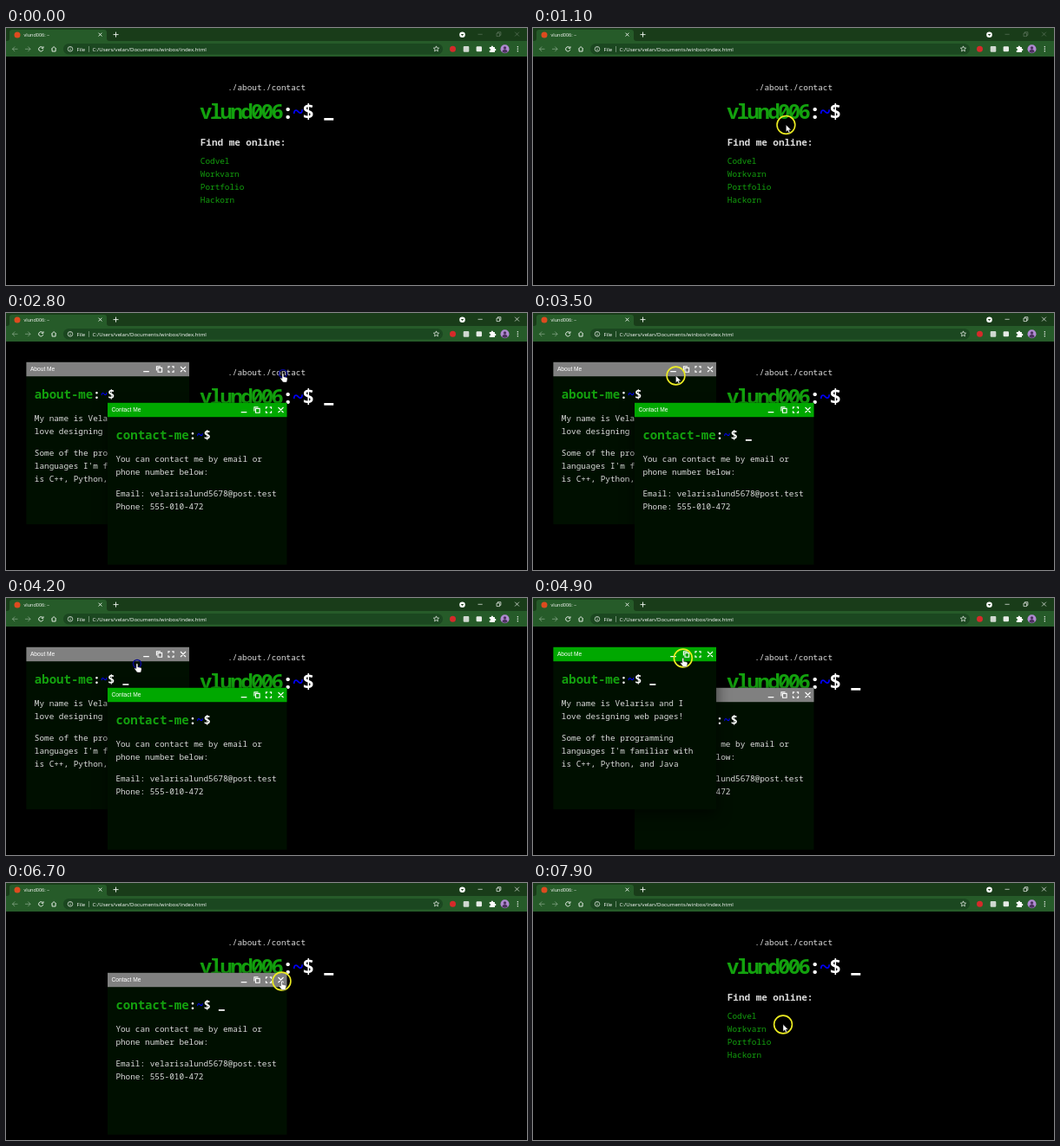
These frames come from a looping animation (600 px wide and 297 px high, 8000 ms). An HTML page:

```html
<!DOCTYPE html>
<html lang="en">
<head>
<meta charset="utf-8">
<title>Terminal page</title>
<style>
  html, body { margin: 0; width: 100%; height: 100%; overflow: hidden; background: #000; }
  svg { display: block; width: 600px; height: 297px; }
  text { white-space: pre; }
  .mono { font: 9.37px "Noto Sans Mono", "DejaVu Sans Mono", monospace; fill: #dcdcdc; }
  .ui { font: 500 6.1px "Open Sans", "Noto Sans", sans-serif; fill: #fff; }
  .bar { font: 6.65px "Liberation Sans", Arial, sans-serif; fill: #fff; }
  .bold { font-weight: 700; }
  .green { fill: #13a10e; }
  .white { fill: #fff; }
  .blue { fill: #0000f5; }
  .line { fill: none; stroke: #f2f6f2; stroke-width: .9; }
  .thin { stroke-width: .7; }
  .icon { stroke: #fff; stroke-width: 1.1; }
  .shade { filter: drop-shadow(0 6px 8px rgba(0, 0, 0, .6)); }
</style>
</head>
<body>
<svg id="stage" viewBox="0 0 600 297" xmlns="http://www.w3.org/2000/svg"></svg>
<script>
const LOOP = 8000, STEP = 100;
const STRIP = "#193c19", TOOLBAR = "#265b29", GREEN = "#00a800", GREY = "#808080";

const text = (x, y, str, cls = "mono", style = "") =>
  `<text x="${x}" y="${y}" class="${cls}" style="${style}">${str}</text>`;
const rect = (x, y, w, h, fill, more = "") =>
  `<rect x="${x}" y="${y}" width="${w}" height="${h}" fill="${fill}" ${more}/>`;
const disc = (x, y, r, fill) => `<circle cx="${x}" cy="${y}" r="${r}" fill="${fill}"/>`;
const line = (d, cls = "", more = "") => `<path class="line ${cls}" d="${d}" ${more}/>`;
const cross = (x, y, r) => `M${x - r} ${y - r}l${2 * r} ${2 * r}m0 ${-2 * r}l${-2 * r} ${2 * r}`;
const prompt = name =>
  `<tspan class="green">${name}</tspan><tspan class="white">:</tspan>` +
  `<tspan class="blue">~</tspan><tspan class="white">$</tspan>`;

function star(x, y, r) {
  const points = Array.from({ length: 10 }, (_, i) => {
    const a = i * Math.PI / 5, d = i % 2 ? r * .45 : r;
    return `${x + d * Math.sin(a)} ${y - d * Math.cos(a)}`;
  });
  return line(`M${points.join("L")}z`, "thin");
}

function tabStrip() {
  return rect(0, 0, 600, 33, STRIP) +
    rect(0, 15, 600, 18, TOOLBAR) +
    `<path d="M1 15q3 0 3-3v-7q0-3 3-3h106q3 0 3 3v7q0 3 3 3z" fill="${TOOLBAR}"/>` +
    disc(13, 8, 3.5, "#dd4b1f") +
    text(20.5, 9.9, "vlund006: ~", "ui", "font-size:5.5px") +
    line(cross(108.5, 7.6, 1.9)) +
    line("M123.5 7.6h6m-3-3v6") +
    disc(525.5, 7.8, 3.3, "#fff") +
    `<path d="M523.8 7h3.4l-1.7 2.1z" fill="${STRIP}"/>` +
    `<g id="frameIcons">` +
    line("M543.5 7.3h5.2M565 6h3.6v3.6h-3.6zM566.3 6v-1.3h3.6v3.6h-1.3" + cross(588.5, 7.1, 2.4), "thin") +
    `</g>`;
}

function toolbar() {
  return line("M13.5 24.3h-6m2.7-2.8l-2.8 2.8l2.8 2.8M22 24.3h6m-2.7-2.8l2.8 2.8l-2.8 2.8", "", 'opacity=".4"') +
    line("M42.2 22.6a2.6 2.6 0 1 0 .6 2.2M43 21.3v2h-2.2") +
    line("M52.2 24.3l2.9-2.7l2.9 2.7M53.1 23.8v3.2h4v-3.2") +
    rect(66, 18, 437, 12.6, "#1b4720", 'rx="6.3"') +
    `<circle class="line thin" cx="74" cy="24.3" r="2.8"/>` +
    line("M74 24v1.8m0-3.4v.8", "thin") +
    text(81.5, 26.5, "File", "ui") +
    rect(95, 21, .6, 6.8, "#a5bda6") +
    text(99.5, 26.5, "C:/Users/velan/Documents/winbox/index.html", "ui") +
    star(495.5, 24.2, 3.3) +
    disc(514.5, 24.3, 3.5, "#d62a2a") +
    rect(526.7, 20.9, 6.6, 6.8, "#cfd8d0", 'rx="1.2"') +
    rect(541.6, 21.2, 6.4, 6, "#e6ebe6", 'rx="1.2"') +
    `<path d="M556.8 22h1.9q0-1.6 1.2-1.6t1.2 1.6h1.8v1.9q1.5 0 1.5 1.2t-1.5 1.2v1.7h-6.1v-2q1.4 0 1.4-1t-1.4-1z" fill="#fff"/>` +
    disc(574.5, 24.3, 5, "#b08ad2") +
    disc(574.5, 23, 1.7, "#4d3160") +
    `<path d="M571.4 27.6q.4-2.8 3.1-2.8t3.1 2.8q-3.1 2.4-6.2 0z" fill="#4d3160"/>` +
    [-2.5, 0, 2.5].map(d => disc(589.3, 24.2 + d, .7, "#fff")).join("");
}

function page() {
  const links = ["Codvel", "Workvarn", "Portfolio", "Hackorn"];
  return text(255.2, 72.4, "./about./contact") +
    text(223, 105, prompt("vlund006"), "mono bold", "font-size:24px;letter-spacing:-2.6px") +
    rect(366.3, 104, 10.9, 2.7, "#fff", 'id="mainCaret"') +
    text(223.8, 136.2, "Find me online:", "mono bold", "font-size:10.96px") +
    links.map((s, i) => text(223.8, 156.5 + 15 * i, s, "mono green")).join("");
}

function win(id, x, y, w, h, title, name, paragraphs) {
  const r = x + w, cy = y + 8.2;
  const icons = `M${r - 52.8} ${y + 10.8}h6.6` +
    `M${r - 36} ${cy - 1.6}h4.6v4.8h-4.6zM${r - 37.6} ${cy + 1.4}v-4.6h4.6` +
    [[-1, -1], [1, -1], [1, 1], [-1, 1]].map(([a, b]) =>
      `M${r - 21 + 3.1 * a} ${cy + 1.2 * b}v${1.9 * b}h${-1.9 * a}`).join("") +
    cross(r - 7, cy, 3);
  let top = y + 53.4;
  const body = paragraphs.map((p, i) => {
    if (i) top += 9.5;
    return p.map(s => text(x + 9.4, top += 15, s)).join("");
  }).join("");
  const caretX = x + 9.8 + 8.43 * (name.length + 4);
  return `<g id="${id}">` +
    rect(x, y, w, h, "#000f00", 'class="shade"') +
    rect(x, y, w, 16.4, GREEN, `id="${id}Bar"`) +
    text(x + 4.5, y + 10.5, title, "bar") +
    line(icons, "icon") +
    text(x + 9.4, y + 42.4, prompt(name), "mono bold", "font-size:14.05px") +
    rect(caretX, y + 42.3, 7, 1.7, "#fff", `id="${id}Caret"`) + body + `</g>`;
}

function pointer() {
  const skin = 'fill="#fff" stroke="#222" stroke-width=".4"';
  return `<g id="pointer"><circle id="ring" fill="none" stroke-width="1.6"/>` +
    `<path id="arrow" d="M0 0v8l1.9-1.7l1.3 3l1.4-.6l-1.3-2.9h2.5z" ${skin}/>` +
    `<path id="hand" d="M-1 .7q0-1 .9-1t.9 1v3.1l3.3.7q1.1.3 1 1.4l-.5 2.9q-.2 1.2-1.2 1.2h-2.6q-.8 0-1.3-.8l-2.5-3.4q-.1-1 1-.8l1 .7z" ${skin}/></g>`;
}

const stage = document.getElementById("stage");
stage.innerHTML = rect(0, 0, 600, 297, "#000") + tabStrip() + toolbar() + page() + `<g id="wins">` +
  win("contact", 117, 103.8, 206.5, 187, "Contact Me", "contact-me", [
    ["You can contact me by email or", "phone number below:"],
    ["Email: velarisalund5678@post.test", "Phone: 555-010-472"]]) +
  win("about", 23.4, 56.8, 187.6, 187.4, "About Me", "about-me", [
    ["My name is Velarisa and I", "love designing web pages!"],
    ["Some of the programming", "languages I'm familiar with", "is C++, Python, and Java"]]) +
  `</g>` + pointer();

const el = {};
stage.querySelectorAll("[id]").forEach(n => el[n.id] = n);
const show = (n, on) => n.setAttribute("visibility", on ? "inherit" : "hidden");

const ENTER = 300, ABOUT_OPEN = 1400, CONTACT_OPEN = 2800;
const ABOUT_RAISE = 4300, ABOUT_CLOSE = 5400, CONTACT_CLOSE = 7100;
const PRESSES = [1400, 2700, 4100, 5400, 7000];

// pointer moves: start, end, x, y
const moves = [
  [300, 500, 294, 229], [700, 1300, 290.5, 71], [2000, 2200, 319, 70],
  [2900, 3500, 164.5, 72.5], [3500, 3700, 92, 60], [3700, 3900, 151, 76],
  [4500, 4900, 172.8, 69.5], [4900, 5300, 204.6, 65.5],
  [5600, 6300, 317.5, 113.5], [7400, 7900, 288, 163.5]
];

// hidden for half a second, then shown for half a second
const blink = (t, start) => (Math.floor((t - start) / 500) & 1) === 1;
const clamp = v => Math.max(0, Math.min(1, v));
const ease = k => k * k * (3 - 2 * k);

function place(t) {
  let x = 300, y = 274;
  for (const [from, to, mx, my] of moves) {
    const k = ease(clamp((t - from) / (to - from)));
    x += (mx - x) * k;
    y += (my - y) * k;
  }
  return [x, y];
}

function drawPointer(t, aboutOn, contactOn) {
  show(el.pointer, t >= ENTER);
  const [x, y] = place(t);
  const inside = (l, top, r, b) => x > l && x < r && y > top && y < b;
  const age = t - Math.max(...PRESSES.filter(p => p < t), -LOOP);
  const fading = age <= 100;
  const hand = fading || inside(255, 64, 345, 76) ||
    aboutOn && inside(168, 57, 211, 73) || contactOn && inside(268, 104, 323, 120);
  el.pointer.setAttribute("transform", `translate(${x} ${y})`);
  show(el.hand, hand);
  show(el.arrow, !hand);
  el.ring.setAttribute("r", fading ? 4.5 : 10.4);
  el.ring.setAttribute("stroke", fading ? "#0a0a8c" : "#ecec22");
  el.ring.setAttribute("opacity", fading ? 1 : clamp((age - 600) / 200));
}

function draw(t) {
  const aboutOn = t >= ABOUT_OPEN && t < ABOUT_CLOSE;
  const contactOn = t >= CONTACT_OPEN && t < CONTACT_CLOSE;
  const aboutTop = t < CONTACT_OPEN || t >= ABOUT_RAISE;
  show(el.about, aboutOn);
  show(el.contact, contactOn);
  show(el.mainCaret, t < ENTER || blink(t, 1100));
  show(el.aboutCaret, aboutOn && blink(t, ABOUT_OPEN));
  show(el.contactCaret, contactOn && blink(t, CONTACT_OPEN));
  const front = aboutTop ? el.about : el.contact;
  if (el.wins.lastChild !== front) el.wins.appendChild(front);
  el.aboutBar.setAttribute("fill", aboutTop ? GREEN : GREY);
  el.contactBar.setAttribute("fill", aboutTop ? GREY : GREEN);
  el.frameIcons.setAttribute("opacity", t >= ABOUT_OPEN ? 1 : .3);
  drawPointer(t, aboutOn, contactOn);
}

const begin = performance.now();
function tick() {
  const t = (performance.now() - begin) % LOOP;
  draw(Math.floor(t / STEP) * STEP);
  requestAnimationFrame(tick);
}
tick();
</script>
</body>
</html>
```
